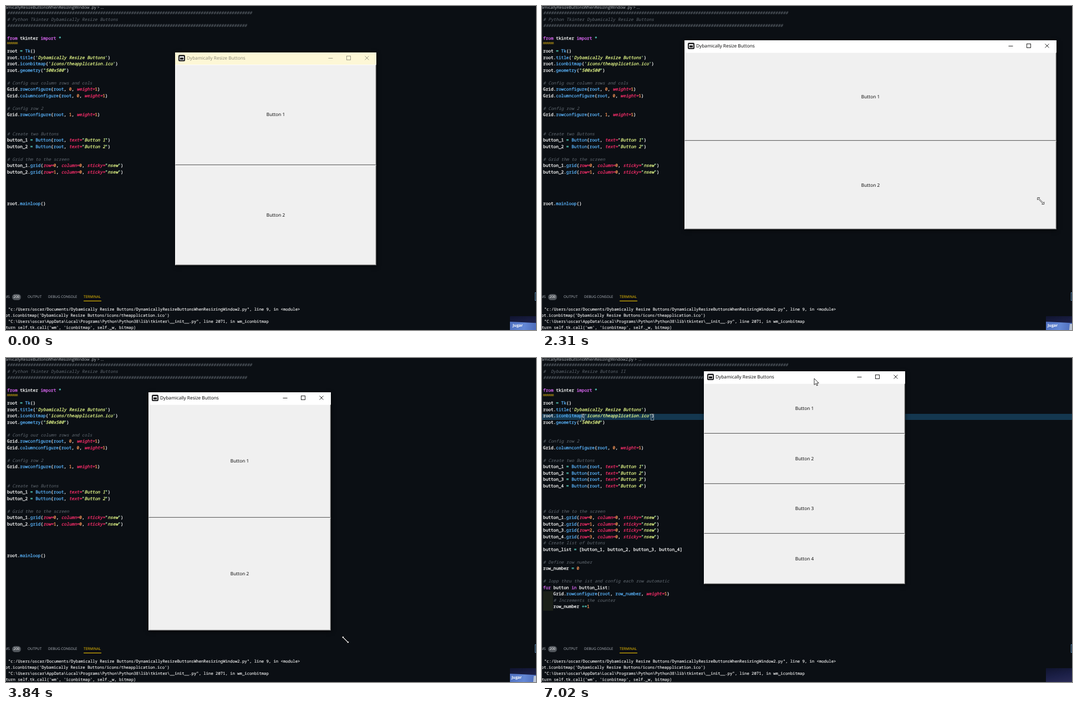
Recreate the animation shown at these times as an HTML page. Size 956 px wide and 586 px high, loop 7050 ms.

```html
<!DOCTYPE html>
<html lang="en">
<head>
<meta charset="utf-8">
<title>Resizing buttons</title>
<style>
html, body { margin: 0; width: 100%; height: 100%; overflow: hidden; background: #0b0f14; }
#stage { position: relative; width: 956px; height: 586px; overflow: hidden; background: #0b0f14;
  text-rendering: geometricPrecision; font-family: "Open Sans", "Noto Sans", sans-serif; }
#stage div, #stage pre, #stage svg { position: absolute; margin: 0; }
.label { white-space: pre; line-height: 12px; margin-top: -6px !important; }
.crumb { font-size: 7.35px; color: #b4b9be; }
.tab { font-size: 6.4px; color: #b4bac2; }
.term { font: 500 7.26px/12px "Noto Sans Mono", monospace; color: #ededed; -webkit-text-stroke: .15px; }
.code { left: 2px; top: 8.25px; font: 500 7.75px/11.5px "Noto Sans Mono", monospace; color: #fff; -webkit-text-stroke: .25px; }
.com { color: #626a72; font-style: italic; -webkit-text-stroke: 0; }
.str { color: #eaff8c; font-style: italic; }
.quo { color: #b4f5b8; }
.key { color: #e56cff; }
.arg { color: #ff2f6d; font-style: italic; }
.fun { color: #5bb6ff; }
.num { color: #ff9a5a; }
.ope { color: #5fe6d4; }
.line { left: 0; top: 101px; width: 956px; height: 11px; background: #14374f; }
.match { top: 101px; width: 4px; height: 10px; border: 1px solid #8a949c; box-sizing: content-box; }
.win { box-shadow: 1px 2px 7px rgba(0,0,0,.6); background: #f0f0f0; }
.bar { left: 0; top: 0; right: 0; height: 22px; background: #fff; }
.idle .bar { background: #fdf7d6; }
.idle .name, .idle .ctl { opacity: .45; }
.name { left: 21px; top: 10.5px; font-size: 8.3px; color: #000; }
.ctl { right: 0; top: 0; }
.body { left: 0; right: 0; top: 22px; bottom: 0; display: flex; flex-direction: column; }
#stage .btn { position: relative; flex: 1; display: flex; align-items: center; justify-content: center;
  box-sizing: border-box; font-size: 8.3px; color: #000; background: #f0f0f0;
  border: 1px solid; border-color: #fbfbfb #696969 #696969 #fbfbfb; box-shadow: inset -1px -1px #cacaca; }
#corner { left: 909px; top: 561px; width: 47px; height: 25px; overflow: hidden;
  background: linear-gradient(170deg, #10142f, #1c2048 55%, #2a2b55); }
#play { left: 0; top: 9px; width: 47px; height: 16px;
  background: linear-gradient(100deg, #4f70c0, #6488d6 55%, #4c6bba); clip-path: polygon(0 6%, 100% 20%, 100% 100%, 0 100%); }
#wedge { right: 0; top: 14px; width: 5px; height: 11px; background: #b9c3d4; clip-path: polygon(20% 0, 100% 0, 100% 100%, 0 100%); }
#jugar { top: 18px; font-size: 7px; font-weight: 700; color: #fff; }
</style>
</head>
<body>
<div id="stage"></div>
<script>
const stage = document.getElementById('stage');

function add(parent, cls, html = '', css = {}) {
  const el = document.createElement('div');
  el.className = cls;
  el.innerHTML = html;
  Object.assign(el.style, css);
  parent.append(el);
  return el;
}
const px = n => n + 'px';
const esc = s => s.replace(/&/g, '&amp;').replace(/</g, '&lt;');
const label = (cls, x, y, text) => add(stage, 'label ' + cls, esc(text), { left: px(x), top: px(y) });
const show = (el, on) => { el.style.visibility = on ? 'visible' : 'hidden'; };

// --- editor ---
const TOKENS = /(?<com>#.*)|(?<quo>['"])(?<str>.*?)\k<quo>|\b(?<key>from|import|for|in)\b|(?<arg>\b\w+=(?=[\d"]))|(?<fun>(?<=\.)\w+(?=\()|\b(?:Tk|Button)(?=\()|(?<=\()root\b|(?<=, )row_number)|(?<num>\b\d+\b)|(?<ope>[=+*]+)/g;
const span = (cls, s) => `<span class="${cls}">${s}</span>`;

function paint(source) {
  return source.replace(TOKENS, (all, ...rest) => {
    const g = rest.at(-1);
    if (g.quo) return span('quo', g.quo) + span('str', g.str) + span('quo', g.quo);
    return span(Object.keys(g).find(k => g[k] !== undefined), all);
  });
}

const rows = (from, to, f) => Array.from({ length: to - from + 1 }, (_, i) => f(from + i)).join('\n');
const makeButton = n => `button_${n} = Button(root, text="Button ${n}")`;
const gridButton = n => `button_${n}.grid(row=${n - 1}, column=0, sticky="nsew")`;
const head = title => `${'#'.repeat(95)}
${title}
${'#'.repeat(93)}

from tkinter import *

root = Tk()
root.title('Dybamically Resize Buttons')
root.iconbitmap('icons/theapplication.ico')
root.geometry("500x500")
`;

const SOURCES = [`${head('# Python Tkinter Dybamically Resize Buttons')}
# Config our column rows and cols
Grid.rowconfigure(root, 0, weight=1)
Grid.columnconfigure(root, 0, weight=1)

# Config row 2
Grid.rowconfigure(root, 1, weight=1)


# Create two Buttons
${rows(1, 2, makeButton)}

# Grid thm to the screen
${rows(1, 2, gridButton)}




root.mainloop()`,
`${head('#  Dybamically Resize Buttons II')}

# Config row 2
Grid.columnconfigure(root, 0, weight=1)

# Create two Buttons
${rows(1, 4, makeButton)}



# Grid thm to the screen
${rows(1, 4, gridButton)}
# Create list of buttons
button_list = [button_1, button_2, button_3, button_4]

# Define row number
row_number = 0

# lopp thru the ist and config each row automatic
for button in button_list:
    Grid.rowconfigure(root, row_number, weight=1)
    # Increments the counter
    row_number +=1`];

const pages = SOURCES.map((source, i) => {
  const page = add(stage, 'page');
  if (i) {
    add(page, 'line');
    for (const col of [15, 42]) add(page, 'match', '', { left: px(1 + col * 4.65) });
    add(page, '', '', { left: '2px', top: '422px', width: '18px', height: '35px', background: '#1b2019' });
  }
  const pre = document.createElement('pre');
  pre.className = 'code';
  pre.innerHTML = paint(source);
  page.append(pre);
  return page;
});
const zig = y => `M2 ${y}` + 'l1.6 -1.8l1.6 1.8'.repeat(6);
add(stage, '', `<svg width="30" height="80" fill="none" stroke="#d9ae12" stroke-width=".9"><path d="${zig(67)}${zig(69)}"/></svg>`, { left: 0, top: 0 });

const crumbs = [' .py > ...', '2.py >'].map(end =>
  label('crumb', -1, 2.5, 'amicallyResizeButtonsWhenResizingWindow' + end));
const dots = label('crumb', 174, 2.5, '...');

// --- panel ---
label('tab', -2.5, 526, 'MS');
add(stage, '', '', { left: '11px', top: '520.5px', width: '16px', height: '11px', borderRadius: '6px', background: '#50555b' });
label('tab', 13.5, 526, '200').style.color = '#fff';
label('tab', 39, 526, 'OUTPUT');
label('tab', 76, 526, 'DEBUG CONSOLE');
label('tab', 140, 526, 'TERMINAL').style.color = '#ffcc00';
add(stage, '', '', { left: '140px', top: '533px', width: '32px', height: '1px', background: '#ffcc00' });
add(stage, '', '', { left: '954px', top: '518px', width: '6px', height: '13px', border: '1px solid #5b8bb4' });

label('term', 4, 549, '"c:/Users/oscar/Documents/Dybamically Resize Buttons/DynamicallyResizeButtonsWhenResizingWindow2.py", line 9, in <module>');
label('term', -1, 560, "ot.iconbitmap('Dybamically Resize Buttons/icons/theapplication.ico')");
label('term', 4, 571, String.raw`"C:\Users\oscar\AppData\Local\Programs\Python\Python38\lib\tkinter\__init__.py", line 2071, in wm_iconbitmap`);
label('term', -.5, 582, "turn self.tk.call('wm', 'iconbitmap', self._w, bitmap)");

const corner = add(stage, '');
corner.id = 'corner';
const [play, wedge, jugar] = ['play', 'wedge', 'jugar'].map(id => {
  const el = add(corner, id === 'jugar' ? 'label' : '', id === 'jugar' ? 'Jugar' : '');
  el.id = id;
  return el;
});

// --- windows ---
const ICON = `<svg width="20" height="20"><rect x="6" y="4.500" width="12" height="11.500" rx="2" fill="#1b1b1d"/>
<rect x="8.500" y="7.500" width="7" height="6" fill="none" stroke="#fff"/><path d="M8 8.500h8" stroke="#fff" stroke-width="1.500"/></svg>`;
const CONTROLS = `<svg class="ctl" width="100" height="22" fill="none" stroke="#111" stroke-width=".9">
<path d="M13.500 10.500h8M79.500 6.500l7 7m0-7l-7 7"/><rect x="46.500" y="6.500" width="7" height="7"/></svg>`;

function makeWindow(count) {
  const win = add(stage, 'win');
  const bar = add(win, 'bar', ICON + CONTROLS);
  add(bar, 'label name', 'Dybamically Resize Buttons');
  const body = add(win, 'body');
  for (let i = 1; i <= count; i++) add(body, 'btn', 'Button ' + i);
  return win;
}

function place(win, x, y, w, h, alpha = 1, scale = 1) {
  Object.assign(win.style, {
    left: px(x), top: px(y), width: px(w), height: px(h),
    opacity: alpha, transform: scale === 1 ? 'none' : `scale(${scale})`
  });
}
const first = makeWindow(2), second = makeWindow(4);

// --- pointer ---
const pointer = add(stage, '', '', { left: 0, top: 0 });
const SHAPES = {
  arrow: '<path d="M0 0V11.500L2.700 9L4.600 13L6.400 12.200L4.600 8.300H8.200Z" fill="#fff" stroke="#000" stroke-width=".8"/>',
  resize: '<path d="M-6 -6H-2L-3.400 -4.600L4.600 3.400L6 2V6H2L3.400 4.600L-4.600 -3.400L-6 -2Z" fill="#fff" stroke="#000" stroke-width=".7"/>',
  beam: '<path d="M-2.500 -5.500H2.500M0 -5.500V5.500M-2.500 5.500H2.500" fill="none" stroke="#e8e8e8" stroke-width="1"/>'
};
const shapes = {};
for (const k in SHAPES) {
  shapes[k] = add(pointer, '', `<svg width="30" height="30" viewBox="-15 -15 30 30" style="left:-15px;top:-15px">${SHAPES[k]}</svg>`);
}

// time, x, y
const PATH = [
  [30, 560, 150], [150, 534, 98], [420, 430, 42], [690, 348, 51], [750, 348, 51], [930, 485, 76], [960, 486, 76],
  [1050, 486, 76], [1350, 617, 444], [1470, 617, 444], [1700, 765, 470], [2000, 930, 450], [2230, 926, 402],
  [2310, 900, 353], [2600, 810, 235], [2900, 745, 205], [3190, 670, 262], [3270, 629.5, 283.5], [3480, 540, 370],
  [3720, 570, 480], [3900, 633, 524], [4020, 633, 524], [4290, 618, 72], [4440, 618, 72],
  [5100, 720, 260], [5500, 640, 170], [5790, 609, 149], [6030, 609, 149], [6300, 106, 101],
  [6360, 106, 101], [6660, 300, 60], [6960, 491, 37]
];

function pointAt(t) {
  const i = PATH.findIndex(p => p[0] > t);
  if (i === 0) return PATH[0].slice(1);
  if (i < 0) return PATH.at(-1).slice(1);
  const [t0, x0, y0] = PATH[i - 1], [t1, x1, y1] = PATH[i];
  const k = (t - t0) / (t1 - t0);
  return [x0 + (x1 - x0) * k, y0 + (y1 - y0) * k];
}

const clamp = (v, lo, hi) => Math.min(hi, Math.max(lo, v));
const LOOP = 7050, SWITCH = 4860, LAG = 80;
const W = 363, H = 385;

function shapeAt(t, x) {
  if (t < 30 || (t >= 4440 && t < 5100)) return null;
  if (t >= 1350 && t < 4020) return 'resize';
  return t >= 5100 && t < 6300 && x > 270 ? 'beam' : 'arrow';
}

function drawFirst(t) {
  show(first, t < 4566);
  first.classList.toggle('idle', t < 150);
  const [cx, cy] = pointAt(clamp(t, 150, 1050));
  const x = Math.round(cx - 229), y = Math.round(cy - 14);
  if (t < 1470) return place(first, x, y, W, H);
  const [rx, ry] = pointAt(clamp(t - LAG, 1470, 4020));
  const alpha = clamp(1 - (t - 4440) / 126.3, 0, 1);
  place(first, x, y, Math.round(rx + 2 - x), Math.round(ry + 3 - y), alpha, 1 - .039 * (1 - alpha));
}

function drawSecond(t) {
  show(second, t > 5907);
  const [cx, cy] = pointAt(Math.max(t, 6360));
  const alpha = clamp((t - 5907) / 150, 0, 1);
  place(second, Math.round(cx - 199), Math.round(cy - 13), W, H, alpha, .956 + .044 * alpha);
}

function draw(t) {
  const later = t >= SWITCH;
  [pages, crumbs].forEach(pair => pair.forEach((el, i) => show(el, later === !!i)));
  show(dots, t >= 5130);
  drawFirst(t);
  drawSecond(t);

  const [x, y] = pointAt(t), kind = shapeAt(t, x);
  pointer.style.transform = `translate(${x}px, ${y}px)`;
  for (const k in shapes) show(shapes[k], k === kind);

  show(play, t < 5010);
  show(jugar, t < 5010);
  show(wedge, t >= 1500 && t < 5010);
  jugar.style.left = px(clamp(5 - (t - 900) / 600, 3, 5));
}

const start = performance.now();
function tick() {
  draw(Math.max(0, performance.now() - start) % LOOP);
  requestAnimationFrame(tick);
}
tick();
</script>
</body>
</html>
```
